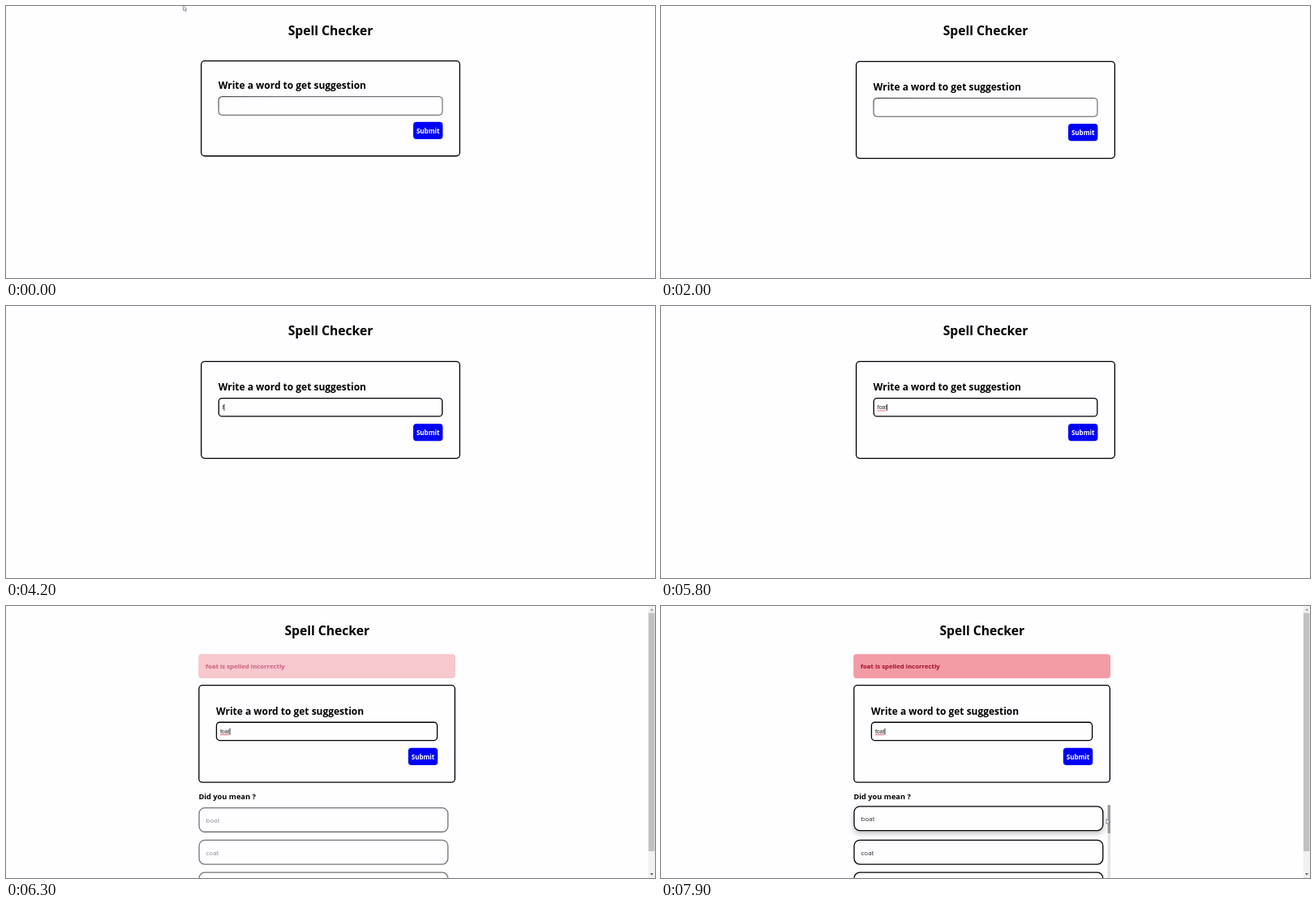
Write an HTML page with a canvas that moves like this. It is 800x335 px and loops after 8 s.

```html
<!DOCTYPE html>
<html lang="en">
<head>
<meta charset="utf-8">
<title>Spell Checker</title>
<style>
  html, body { margin: 0; width: 100%; height: 100%; overflow: hidden; background: #fefdff; }
  canvas { display: block; width: 800px; height: 335px; }
</style>
</head>
<body>
<canvas id="stage" width="800" height="335"></canvas>
<script>
const ctx = document.getElementById('stage').getContext('2d');
const LOOP = 8000, STEP = 100;
const UI = '"Open Sans", "Noto Sans", sans-serif';
const ARIAL = '"Liberation Sans", Arial, sans-serif';
const BG = '#fefdff', INK = '#000';

// Form geometry: x positions and rows from top to bottom
const START = { mid: 400, left: 240, right: 560, inL: 261.6, inR: 538.4, top: 67, bottom: 185.4, label: 102.3, input: 111.2, button: 142.8 };
const REST = { ...START, top: 67.8, bottom: 188.2, label: 104, input: 113, button: 145 };
const RESULT = { mid: 395.7, left: 237.2, right: 554, inL: 258.8, inR: 532.2, top: 97, bottom: 217.8, label: 133.6, input: 142.6, button: 174.8 };

const TYPED = [[4700, 'foat'], [4500, 'foa'], [4300, 'fo'], [4200, 'f']];
const POINTER = [[523, 217], [532, 237], [556, 252], [574, 261], [562, 263], [545, 262], [549, 262]];

const clamp = v => Math.max(0, Math.min(1, v));

function mix(a, b, p) {
  const out = {};
  for (const k in a) out[k] = a[k] + (b[k] - a[k]) * p;
  return out;
}

function text(str, x, y, size, { bold = true, color = INK, align = 'left', family = UI } = {}) {
  ctx.font = `${bold ? 700 : 400} ${size}px ${family}`;
  ctx.textAlign = align;
  ctx.fillStyle = color;
  ctx.fillText(str, x, y);
}

function path(x, y, w, h, r) {
  ctx.beginPath();
  ctx.roundRect(x, y, w, h, r);
}

function fillBox(x, y, w, h, r, color) {
  path(x, y, w, h, r);
  ctx.fillStyle = color;
  ctx.fill();
}

// Outer edges given; the border lies inside them
function border(x, y, w, h, r, line, color = INK) {
  path(x + line / 2, y + line / 2, w - line, h - line, r);
  ctx.lineWidth = line;
  ctx.strokeStyle = color;
  ctx.stroke();
}

function poly(points, color) {
  ctx.beginPath();
  points.forEach(([x, y]) => ctx.lineTo(x, y));
  ctx.closePath();
  ctx.fillStyle = color;
  ctx.fill();
}

function pointer(x, y) {
  poly([[0, 0], [0, 6.2], [1.4, 5], [2.5, 7.2], [3.4, 6.8], [2.5, 4.6], [4.4, 4.5]].map(([a, b]) => [x + a, y + b]), '#fff');
  ctx.lineWidth = 0.6;
  ctx.strokeStyle = '#555';
  ctx.stroke();
}

function caretOn(t) {
  if (t < 2400) return false;
  if (t < 4200) return Math.floor((t - 2400) / 500) % 2 === 0;
  if (t < 6000) return t < 5200 || t >= 5700;
  return t < 6800 || t >= 7300;
}

function squiggle(x, y, w) {
  ctx.beginPath();
  for (let i = 0; i <= w; i++) ctx.lineTo(x + i, y + (i % 2 ? 0.35 : -0.35));
  ctx.lineWidth = 0.8;
  ctx.strokeStyle = '#e5303c';
  ctx.stroke();
}

function inputField(g, t) {
  const w = g.inR - g.inL, h = 23.6;
  if (t >= 2400) {
    border(g.inL, g.input, w, h, 4, 1.3);
  } else {
    const shade = ctx.createLinearGradient(g.inL, g.input, g.inL + 8, g.input + h);
    shade.addColorStop(0, '#1c1c1c');
    shade.addColorStop(1, '#4a4a4a');
    border(g.inL, g.input, w, h, 4, 0.95, shade);
  }
  const word = (TYPED.find(([at]) => t >= at) || [0, ''])[1];
  const x = g.inL + 5.1, base = g.input + 14.1;
  text(word, x, base, 7.1, { bold: false, color: '#222', family: ARIAL });
  const end = x + ctx.measureText(word).width;
  if (t >= 5800) squiggle(x, base + 1.8, end - x);
  if (caretOn(t)) {
    ctx.fillStyle = '#111';
    ctx.fillRect(end - 0.1, base - 6.2, 0.8, 8);
  }
}

function form(g, t) {
  text('Spell Checker', g.mid, 36, 15.65, { align: 'center' });
  border(g.left, g.top, g.right - g.left, g.bottom - g.top, 4.2, 1.3);
  text('Write a word to get suggestion', g.inL + 0.2, g.label, 11.97);
  inputField(g, t);
  fillBox(g.inR - 36.4, g.button, 36.4, 21.2, 4, '#0000f6');
  text('Submit', g.inR - 18.2, g.button + 14, 8, { align: 'center', color: '#fff' });
}

function item(word, y, lift) {
  const top = y - 1.7 * lift;
  if (lift) {
    ctx.save();
    ctx.shadowColor = `rgba(0,0,0,${0.25 * lift})`;
    ctx.shadowBlur = 6;
    ctx.shadowOffsetY = 3;
    fillBox(237.4, top, 308, 31, 7, BG);
    ctx.restore();
  }
  border(237.4, top, 308, 31, 7, 1.3);
  text(word, 246.5, top + 19.1, 8, { bold: false, color: '#2a2a2a' });
}

function results(t) {
  ctx.globalAlpha = Math.pow(clamp((t - 6000) / 500), 1.2);
  fillBox(237.2, 59.2, 316.8, 29.8, 4, '#f39ca5');
  text('foat is spelled incorrectly', 246, 77.4, 7.78, { color: '#a30d2d' });
  const lift = clamp((t - 7600) / 200);
  ['boat', 'coat', 'goat'].forEach((word, i) => item(word, 247.9 + i * 39.8, i ? 0 : lift));
  ctx.globalAlpha = 1;
  text('Did you mean ?', 237.4, 237.6, 9.26);
  if (t >= 7700) {
    fillBox(550.6, 245, 3.4, 90, 0, '#e2e1e3');
    fillBox(550.6, 245, 3.4, 35, 1, '#9a9a9a');
  }
}

function pageScroll() {
  ctx.fillStyle = '#f1f1f1';
  ctx.fillRect(791.7, 0, 8.3, 335);
  ctx.fillStyle = '#c1c1c1';
  ctx.fillRect(792, 8.5, 7.4, 293.5);
  poly([[794, 5.4], [798, 5.4], [796, 3.2]], '#8a8a8a');
  poly([[794, 329.2], [798, 329.2], [796, 331.6]], '#404040');
}

function draw(t) {
  ctx.fillStyle = BG;
  ctx.fillRect(0, 0, 800, 335);
  if (t < 6000) {
    form(mix(START, REST, clamp((t - 600) / 500)), t);
  } else {
    form(RESULT, t);
    results(t);
    pageScroll();
  }
  if (t < 100) pointer(218.6, -0.6);
  if (t >= 7300) pointer(...POINTER[(t - 7300) / STEP]);
}

const begin = performance.now();
function tick() {
  const t = Math.max(0, performance.now() - begin) % LOOP;
  draw(Math.floor(t / STEP) * STEP);
  requestAnimationFrame(tick);
}
tick();
</script>
</body>
</html>
```
